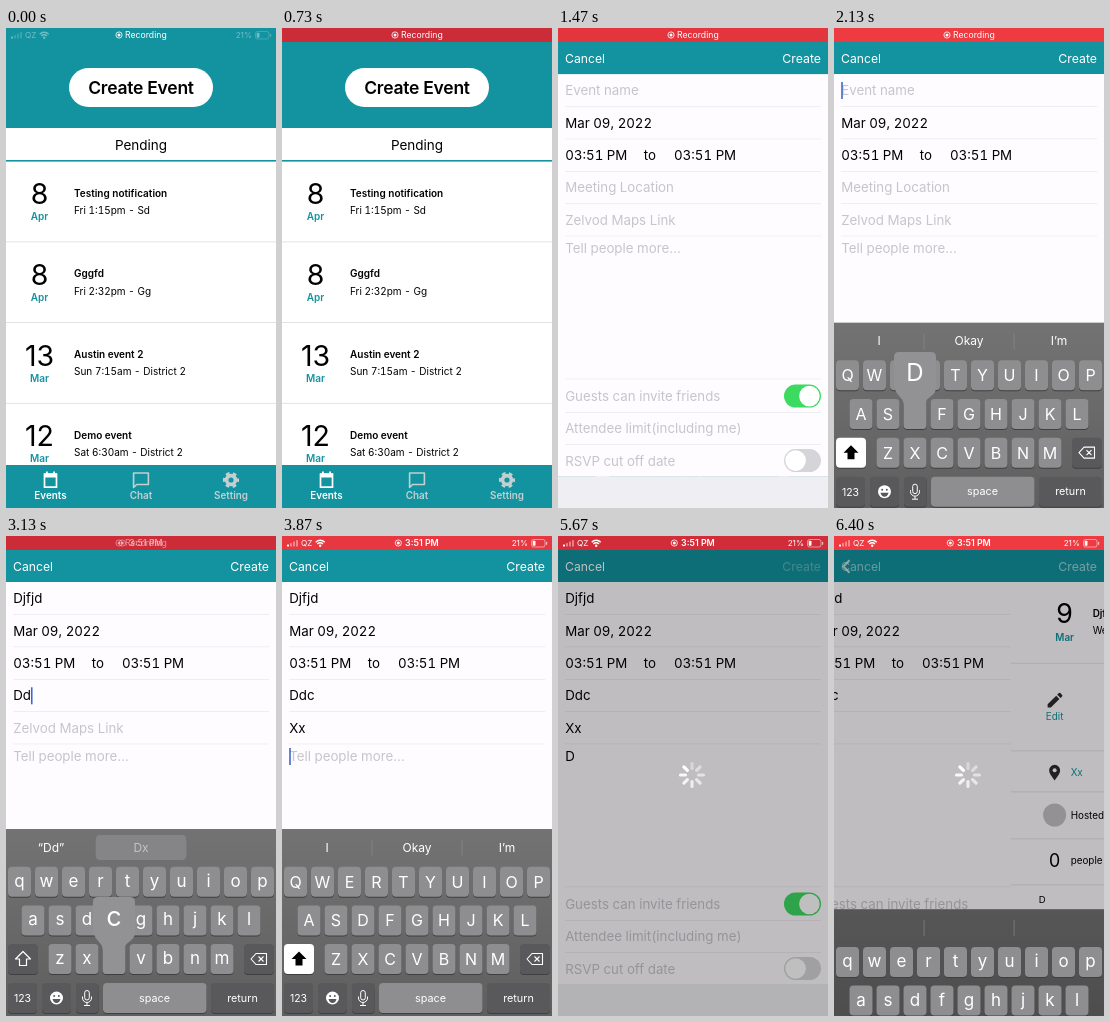
Animation of 270x480 px, one loop 6470 ms. Source, as an HTML page:

```html
<!DOCTYPE html>
<html lang="en">
<head>
<meta charset="utf-8">
<title>Event planner</title>
<style>
  html, body { margin: 0; width: 100%; height: 100%; overflow: hidden; background: #fff; }
  svg { display: block; width: 100%; height: 100%; font-family: Inter, "Liberation Sans", sans-serif; }
  text { white-space: pre; }
  #modal, .info { font-variant-numeric: tabular-nums; }
</style>
</head>
<body>
<svg viewBox="0 0 270 480">
  <defs>
    <linearGradient id="kbFill" x2="0" y2="1">
      <stop stop-opacity=".55"/><stop offset="1" stop-opacity=".63"/>
    </linearGradient>
  </defs>
  <g id="list"></g>
  <g id="modal">
    <g id="form"></g>
    <g id="detail"></g>
    <g id="nav"></g>
  </g>
  <g id="backing"><rect y="293" width="270" height="190" fill="#fff"/></g>
  <rect id="dim" width="270" height="480"/>
  <g id="keyboard"></g>
  <g id="spinner"></g>
  <g id="status"></g>
</svg>
<script>
const LOOP = 6470, TEAL = '#12939f', HINT = '#c6c5ca';
const KB_TOP = 293, KB_HEIGHT = 187, KEY_HOLD = 100;
const el = id => document.getElementById(id);

// Drawing helpers
const text = (x, y, s, size, fill = '#000', weight = 400, anchor = 'start') =>
  `<text x="${x}" y="${y}" font-size="${size}" fill="${fill}" font-weight="${weight}" text-anchor="${anchor}">${s}</text>`;
const mid = (x, y, s, size, fill, weight) => text(x, y, s, size, fill, weight, 'middle');
const rect = (x, y, w, h, fill, r = 0, more = '') =>
  `<rect x="${x}" y="${y}" width="${w}" height="${h}" rx="${r}" fill="${fill}" ${more}/>`;
const disc = (x, y, r, fill, more = '') => `<circle cx="${x}" cy="${y}" r="${r}" fill="${fill}" ${more}/>`;
const stroke = (d, color, width, more = '') =>
  `<path d="${d}" fill="none" stroke="${color}" stroke-width="${width}" ${more}/>`;
const shape = (d, fill) => `<path d="${d}" fill="${fill}"/>`;

// Timing helpers
const ramp = (t, a, b) => Math.min(1, Math.max(0, (t - a) / (b - a)));
const rest = ms => { // remaining distance of a critically damped spring
  const x = Math.max(0, ms) * 0.01826;
  return (1 + x) * Math.exp(-x);
};

const cache = {};
function fill(id, html) {
  if (cache[id] !== html) el(id).innerHTML = cache[id] = html;
}
const move = (id, x, y) => el(id).setAttribute('transform', `translate(${x} ${y})`);
const opacity = (id, v) => el(id).setAttribute('opacity', Math.min(1, Math.max(0, v)));

// Event list
const events = [
  [8, 'Apr', 'Testing notification', 'Fri 1:15pm - Sd'],
  [8, 'Apr', 'Gggfd', 'Fri 2:32pm - Gg'],
  [13, 'Mar', 'Austin event 2', 'Sun 7:15am - District 2'],
  [12, 'Mar', 'Demo event', 'Sat 6:30am - District 2'],
];
const OFF = '#c3d0d2';
fill('list',
  rect(0, 0, 270, 480, '#fff') + rect(0, 0, 270, 100, TEAL) +
  rect(63, 40, 144, 39, '#fff', 19.5) +
  `<g letter-spacing="-.25">${mid(135, 66, 'Create Event', 17.5, '#000', 600)}</g>` +
  mid(135, 122, 'Pending', 13.5) + rect(0, 132, 270, 1.6, TEAL) +
  events.map(([day, month, title, info], i) => {
    const y = i * 80.7;
    return mid(33.5, 176.2 + y, day, 28.5) + mid(33.5, 192.3 + y, month, 10, TEAL, 600) +
      text(68, 168.7 + y, title, 10, '#000', 600) +
      `<g class="info">${text(68, 186 + y, info, 10)}</g>` +
      rect(0, 213.5 + y, 270, 0.8, '#dcdcde');
  }).join('') +
  rect(0, 437, 270, 43, TEAL) +
  stroke('M38.5 446.2h12v13h-12z', '#fff', 1.7) + rect(38, 445.5, 13, 4, '#fff') +
  rect(40, 443.5, 1.8, 3, '#fff') + rect(47.2, 443.5, 1.8, 3, '#fff') +
  stroke('M127.6 459.5V445H142.4V456.5H130.6Z', OFF, 1.6, 'stroke-linejoin="round"') +
  disc(225, 452, 4.4, 'none', `stroke="${OFF}" stroke-width="3.6"`) +
  disc(225, 452, 6.9, 'none', `stroke="${OFF}" stroke-width="2.4" stroke-dasharray="3.8 3.425" stroke-dashoffset="1.9"`) +
  mid(44.5, 471.3, 'Events', 9.9, '#fff', 600) + mid(135, 471.3, 'Chat', 9.9, OFF, 600) +
  mid(225, 471.3, 'Setting', 9.9, OFF, 600));

// Event form
const SIZE = 13.3;
const fields = [
  { y: 67, hint: 'Event name', focus: 1700 },
  { y: 164.3, hint: 'Meeting Location', focus: 2640 },
  { y: 196.6, hint: 'Zelvod Maps Link', focus: 3400 },
  { y: 225, hint: 'Tell people more…', focus: 3830 },
];
const presses = [ // time, field, character
  [2070, 0, 'D'], [2200, 0, 'j'], [2300, 0, 'f'], [2400, 0, 'j'], [2500, 0, 'd'],
  [2760, 1, 'D'], [2930, 1, 'd'], [3090, 1, 'c'],
  [3520, 2, 'X'], [3660, 2, 'x'], [3950, 3, 'D'],
];
const valueOf = (field, t) =>
  presses.filter(p => p[1] === field && t >= p[0] + KEY_HOLD).map(p => p[2]).join('');

const toggle = (y, on) =>
  rect(226, y, 37, 23, on ? '#3cda61' : '#d5d4d8', 11.5) + disc(on ? 251.4 : 237.6, y + 11.5, 10.3, '#fff');
const formBase =
  rect(0, 0, 270, 448, '#fefcff') + rect(0, 448, 270, 32, '#efeef3') +
  [78.3, 110.5, 143, 175.3, 207.6, 350.5, 384, 416].map(y => rect(7, y, 256, 0.7, '#e9e8ec')).join('') +
  text(7.2, 99.5, 'Mar 09, 2022', SIZE) + text(7.2, 131.8, '03:51 PM', SIZE) +
  text(85.8, 131.8, 'to', SIZE) + text(116, 131.8, '03:51 PM', SIZE) +
  text(7.2, 372.8, 'Guests can invite friends', SIZE, HINT) + toggle(356.5, true) +
  text(7.2, 405.3, 'Attendee limit(including me)', SIZE, HINT) +
  text(7.2, 437.5, 'RSVP cut off date', SIZE, HINT) + toggle(421, false);

function drawForm(t, active, typing) {
  fill('form', formBase + fields.map((f, i) => {
    const v = valueOf(i, t);
    return `<g class="field">${text(7.2, f.y, v || f.hint, SIZE, v ? '#000' : HINT)}</g>`;
  }).join('') + `<rect id="caret" y="${fields[active].y - 13}" width="1.6" height="17" fill="#3f68cc"/>`);
  const label = document.querySelectorAll('.field text')[active];
  el('caret').setAttribute('x', 7.2 + (valueOf(active, t) ? label.getComputedTextLength() : 0));
  opacity('caret', typing ? 1 : 0);
}

// Event detail page
const INK = '#2c2c2e';
fill('detail',
  rect(0, 0, 270, 480, '#fefcff') +
  mid(54, 87, 9, 27) + mid(54, 104.5, 'Mar', 9.9, TEAL, 600) +
  text(82, 80.7, 'Djfjd', 9.9, '#000', 600) + text(82, 98, 'Wed 3:51pm - Ddc', 9.9) +
  [126.8, 214.5, 255.5, 302.5, 348.5].map(y => rect(0, y, 270, 0.8, '#dfdee1')).join('') +
  shape('M37 171.5v-3.2l8.6-8.6 3.2 3.2-8.6 8.6zM46.6 158.7l1.6-1.6q.8-.6 1.5 0l1.8 1.8q.6.7 0 1.5l-1.6 1.6z', INK) +
  mid(44, 184, 'Edit', 9.9, TEAL) +
  shape('M44 244.5c-3-4-5.5-7-5.5-10.2a5.5 5.5 0 0 1 11 0c0 3.2-2.5 6.2-5.5 10.2z', INK) +
  disc(44, 234.3, 2, '#fff') + text(60, 240, 'Xx', 9.9, TEAL) +
  disc(44, 279, 11.5, '#c2c2c5') + text(60, 282.7, 'Hosted by me', 9.9) +
  mid(44, 331, 0, 18) + text(60, 328, 'people going', 9.9) + text(28, 367, 'D', 9.5));

fill('nav', rect(0, 0, 270, 46, TEAL) +
  `<g id="cancel">${text(7, 35, 'Cancel', 12.2, '#fff')}</g>` +
  `<g id="create">${text(263, 35, 'Create', 12.3, '#fff', 400, 'end')}</g>` +
  `<g id="back">${stroke('M15.5 24.3L9.5 30.5L15.5 36.7', '#fff', 2)}</g>`);

// Keyboard
const KEY = '#8e8e90', DARK = '#59595b';
const letters = {};
['qwertyuiop', 'asdfghjkl', 'zxcvbnm'].forEach((row, r) =>
  [...row].forEach((c, i) => letters[c] = [[13.5, 27, 54][r] + 27 * i, 345.7 + 38.7 * r]));

const keyCap = (x, y, w, color) =>
  rect(x, y - 14, w, 30, '#3f3f41', 4) + rect(x, y - 15, w, 30, color, 4);

function suggestions(word) {
  const hint = (x, s, color = '#fff') => mid(x, 315.5, s, 12, color);
  if (!word) return hint(45, 'I') + hint(135, 'Okay') + hint(225, 'I’m');
  const correction = word === 'Dd' ? rect(90, 299, 90, 25, '#858587', 4) + hint(135, 'Dx', '#c4c4c6') : '';
  return correction + hint(45, `“${word}”`);
}

const BUBBLE = 'M-16-62h32q5 0 5 5v30q0 6-6 10t-4 9v19q0 4-4 4h-14q-4 0-4-4v-19q0-5-4-9t-6-10v-30q0-5 5-5z';
function popup(char) {
  const [x, y] = letters[char.toLowerCase()];
  const size = char < 'a' ? 24 : 27;
  return `<g transform="translate(${x} ${y})">${shape(BUBBLE, '#929294')}${mid(0, -33, char, size, '#fff')}</g>`;
}

function drawKeyboard(word, pressed, hints) {
  const upper = !word;
  const arrow = 'M17 415.5l7.5 7.5h-4v6.5h-7v-6.5h-4z';
  fill('keyboard',
    rect(0, KB_TOP, 270, 190, 'url(#kbFill)') +
    rect(89.7, 304, 0.7, 16, '#88888a') + rect(179.7, 304, 0.7, 16, '#88888a') +
    (hints ? suggestions(word) : '') +
    Object.entries(letters).map(([c, [x, y]]) => keyCap(x - 11.5, y, 23, KEY) +
      (upper ? mid(x, y + 6, c.toUpperCase(), 16, '#fff') : mid(x, y + 5, c, 17, '#fff'))).join('') +
    keyCap(2, 423, 30, upper ? '#fff' : DARK) +
    (upper ? shape(arrow, '#000') : stroke(arrow, '#fff', 1.2, 'stroke-linejoin="round"')) +
    keyCap(238, 423, 30, DARK) +
    stroke('M245 423l5-5.5h10.5v11h-10.5zM252.5 420.5l5 5m0-5l-5 5', '#fff', 1.1, 'stroke-linejoin="round"') +
    keyCap(2, 462, 29, DARK) + mid(16.5, 466, '123', 10.5, '#fff') +
    keyCap(36, 462, 29, DARK) + disc(50.5, 462, 6.5, '#fff') +
    disc(48.2, 460, 1, DARK) + disc(52.8, 460, 1, DARK) + shape('M46.5 463h8q-1 4-4 4t-4-4z', DARK) +
    keyCap(70, 462, 22.5, DARK) + rect(78.7, 454.5, 4.6, 9.5, 'none', 2.3, 'stroke="#fff"') +
    stroke('M76.5 460.5v1.5a4.5 4.5 0 0 0 9 0v-1.5M81 466.5v3m-3 0h6', '#fff', 1) +
    keyCap(97, 462, 103.5, KEY) + mid(148.5, 465.5, 'space', 10.8, '#fff') +
    keyCap(205, 462, 63, DARK) + mid(236.5, 465.5, 'return', 10.8, '#fff') +
    (pressed ? popup(pressed) : ''));
}

function keyboardOffset(t) {
  if (t < 4090) return KB_HEIGHT * rest(t - 1760);
  if (t < 6296) return KB_HEIGHT * (1 - rest(t - 4090));
  return KB_HEIGHT * rest(t - 6296);
}

// Spinner
fill('spinner', Array.from({ length: 8 }, (_, i) =>
  stroke('M0-6.5V-11.5', '#fff', 3.2, `stroke-linecap="round" transform="translate(134 239) rotate(${i * 45})"`)).join(''));
const spokes = [...el('spinner').children];

// Status bar
const recIcon = x => disc(x, 7, 3.1, 'none', 'stroke="#fff" stroke-width=".8"') + disc(x, 7, 1.5, '#fff');
fill('status', '<rect id="alert" width="270" height="14"/>' +
  `<g id="recording">${recIcon(113) + text(119, 10.3, 'Recording', 8.7, '#fff')}</g>` +
  `<g id="clock">${recIcon(116.3) + text(123, 10.3, '3:51 PM', 8.9, '#fff', 600)}</g>` +
  '<g id="carrier">' +
  [0, 1, 2, 3].map(i => rect(5 + i * 3, 8.5 - i * 1.5, 2, 2 + i * 1.5, '#fff', 0.5, i ? 'opacity=".4"' : '')).join('') +
  text(19, 10.3, 'QZ', 8.2, '#fff') +
  stroke('M33.7 6.2a6.3 6.3 0 0 1 9 0M35.4 8a3.9 3.9 0 0 1 5.6 0', '#fff', 1.4) + disc(38.2, 9.7, 1.2, '#fff') +
  text(246, 10.2, '21%', 8.2, '#fff', 400, 'end') +
  rect(249.5, 3.5, 13.5, 7.5, 'none', 2, 'stroke="#fff" stroke-width=".7" opacity=".7"') +
  rect(250.7, 4.7, 2.8, 5.1, '#fff', 0.8) + rect(264, 5.8, 1.2, 3, '#fff', 0.6, 'opacity=".7"') +
  '</g>');

function drawStatus(t) {
  const glow = 0.5 + 0.5 * Math.cos((t - 1950) / 2300 * 2 * Math.PI);
  el('alert').setAttribute('fill', `rgb(${204 + 36 * glow},${43 + 16 * glow},${56 + 10 * glow})`);
  opacity('alert', ramp(t, 0, 600));
  const swap = ramp(t, 3030, 3230);
  opacity('recording', 1 - swap);
  opacity('clock', swap);
  opacity('carrier', t < 1000 ? 0.4 * (1 - ramp(t, 0, 200)) : ramp(t, 3160, 3360));
}

function draw(t) {
  const active = Math.max(0, fields.findLastIndex(f => f.focus <= t));
  const typing = t >= 1700 && t < 4090;
  const press = presses.find(p => t >= p[0] && t < p[0] + KEY_HOLD);
  const push = 1 - rest(t - 6334);

  move('modal', 0, 480 * rest(t - 880));
  move('form', -81 * push, 0);
  move('detail', 270 * (1 - push), 0);
  drawForm(t, active, typing);
  opacity('cancel', 1 - 1.4 * push);
  opacity('back', 2 * push);
  opacity('create', t > 4150 && t < 6250 ? 0.3 : 1 - 1.2 * push);

  drawKeyboard(valueOf(active, t), press && press[2], t < 6000);
  const drop = keyboardOffset(t);
  move('keyboard', 0, drop);
  move('backing', 0, drop);

  const wait = ramp(t, 4150, 4400);
  opacity('dim', 0.25 * wait);
  opacity('spinner', wait);
  const step = Math.floor((t > 6000 && t < 6130 ? 6000 : t) / 100);
  spokes.forEach((s, i) => s.setAttribute('opacity', 0.4 + 0.6 * ((i - step % 8 + 8) % 8) / 7));

  drawStatus(t);
}

// The resting keyboard and modal lie just below the stage until needed.
const start = performance.now();
function tick() {
  draw((performance.now() - start) % LOOP);
  requestAnimationFrame(tick);
}
tick();
</script>
</body>
</html>
```
